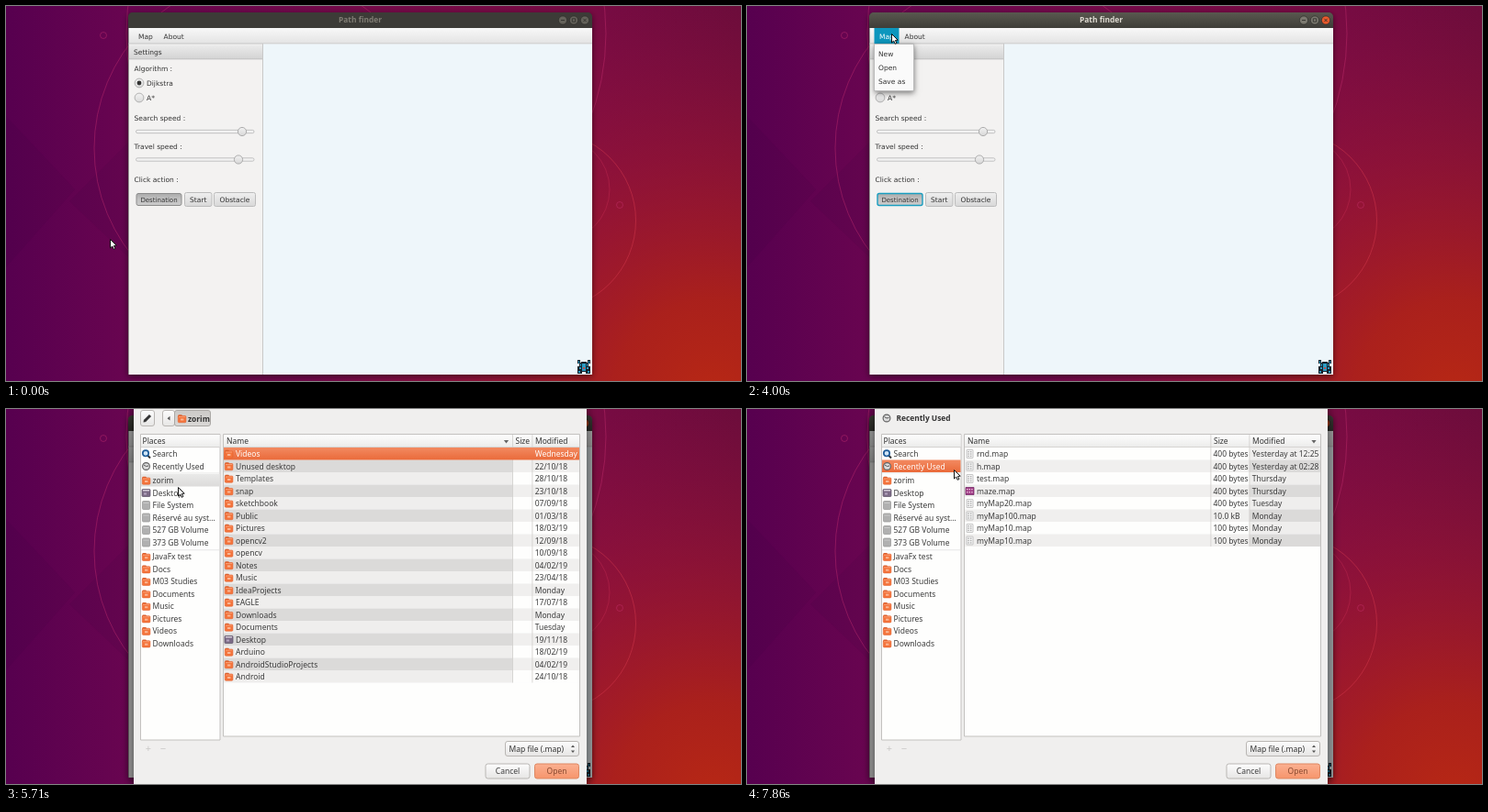
An HTML page with a canvas for the animation above (8 s loop, 800 px wide and 409 px high).

```html
<!DOCTYPE html>
<html lang="en">
<head>
<meta charset="utf-8">
<title>Path finder</title>
<style>
html, body { margin: 0; height: 100%; overflow: hidden; background: #58004f; }
canvas { display: block; }
</style>
</head>
<body>
<canvas id="stage" width="800" height="409"></canvas>
<script>
const c = document.getElementById('stage').getContext('2d');
const LOOP = 8000, FPS = 7;
const FX = '7.5px "DejaVu Sans", sans-serif';
const GTK = '8.5px "Noto Sans", sans-serif';
const BOLD = 'bold 8.4px "Noto Sans", sans-serif';
const USER = 'zorim';

// Steps (at 7 per second) at which the interface changes
const MENU_OPEN = 26, MENU_CLOSE = 34, MODAL = 36, DIALOG = 38, RECENT = 52;

// Pointer path: step, x, y
const PATH = [[0, 113, 254], [5, 113, 254], [11, 158, 150], [15, 158, 150], [18, 169, 105],
  [23, 157, 30], [30, 157, 30], [33, 152, 64], [35, 155, 66], [37, 168, 69], [40, 187, 85],
  [43, 196, 100], [47, 256, 193], [51, 200, 64], [53, 206, 62], [55, 225, 66]];

const PLACES = ['Search', 'Recently Used', USER, 'Desktop', 'File System', 'Réservé au syst…',
  '527 GB Volume', '373 GB Volume', 'JavaFx test', 'Docs', 'M03 Studies', 'Documents', 'Music',
  'Pictures', 'Videos', 'Downloads'];

const HOME = `Videos,Wednesday|Unused desktop,22/10/18|Templates,28/10/18|snap,23/10/18
sketchbook,07/09/18|Public,01/03/18|Pictures,18/03/19|opencv2,12/09/18|opencv,10/09/18
Notes,04/02/19|Music,23/04/18|IdeaProjects,Monday|EAGLE,17/07/18|Downloads,Monday
Documents,Tuesday|Desktop,19/11/18|Arduino,18/02/19|AndroidStudioProjects,04/02/19
Android,24/10/18`.split(/[|\n]/).map(row => row.split(','));

const RECENT_FILES = `rnd.map,400 bytes,Yesterday at 12:25|h.map,400 bytes,Yesterday at 02:28
test.map,400 bytes,Thursday|maze.map,400 bytes,Thursday|myMap20.map,400 bytes,Tuesday
myMap100.map,10.0 kB,Monday|myMap10.map,100 bytes,Monday
myMap10.map,100 bytes,Monday`.split(/[|\n]/).map(row => row.split(','));

function rect(x, y, w, h, fill) {
  c.fillStyle = fill;
  c.fillRect(x, y, w, h);
}

function vertical(y, h, ...colors) {
  const g = c.createLinearGradient(0, y, 0, y + h);
  colors.forEach((color, i) => g.addColorStop(i / (colors.length - 1), color));
  return g;
}

function box(x, y, w, h, r, fill, stroke, width = 1) {
  c.beginPath();
  c.roundRect(x, y, w, h, r);
  c.fillStyle = fill;
  c.fill();
  if (stroke) line(stroke, width);
}

function line(stroke, width = 1) {
  c.strokeStyle = stroke;
  c.lineWidth = width;
  c.stroke();
}

function circle(x, y, r, fill, stroke, width) {
  c.beginPath();
  c.arc(x, y, r, 0, 7);
  if (fill) { c.fillStyle = fill; c.fill(); }
  if (stroke) line(stroke, width);
}

function poly(points, fill) {
  c.beginPath();
  points.forEach(([x, y]) => c.lineTo(x, y));
  c.closePath();
  c.fillStyle = fill;
  c.fill();
}

function text(s, x, y, font, fill = '#333', align = 'left') {
  c.font = font;
  c.fillStyle = fill;
  c.textAlign = align;
  c.fillText(s, x, y);
}

function shadow(blur, draw) {
  c.save();
  c.shadowColor = 'rgba(0,0,0,.5)';
  c.shadowBlur = blur;
  c.shadowOffsetY = 2;
  draw();
  c.restore();
}

function wallpaper() {
  let g = c.createLinearGradient(0, 0, 800, 0);
  [[0, '#57004f'], [.17, '#690550'], [.5, '#760a49'], [.8, '#780b43'], [1, '#6b0c3b']]
    .forEach(stop => g.addColorStop(...stop));
  rect(0, 0, 800, 409, g);
  g = c.createRadialGradient(770, 430, 0, 770, 430, 440);
  [[0, 'rgba(184,40,20,1)'], [.25, 'rgba(180,36,22,.85)'], [.6, 'rgba(172,26,44,.45)'], [1, 'rgba(160,20,60,0)']]
    .forEach(stop => g.addColorStop(...stop));
  rect(0, 0, 800, 409, g);
  const dark = 'rgba(40,0,50,.08)';
  poly([[0, 120], [75, 200], [0, 285]], dark);
  poly([[69, 213], [150, 132], [150, 290]], dark);
  const pink = 'rgba(205,50,115,.4)';
  circle(283, 155, 187, null, pink, 1);
  circle(392, 30, 261, null, pink, 1);
  circle(588, 234, 97.5, null, 'rgba(220,60,80,.45)', 1);
  circle(600, 200, 57, null, 'rgba(210,50,90,.35)', 1);
  circle(106, 32, 3.5, null, pink, 1);
  circle(668, 217, 3.5, null, pink, 1);
}

function titleButtons(focused, modal) {
  const glyphs = modal ? ['', '-', 'x'] : ['-', 'o', 'x'];
  glyphs.forEach((glyph, i) => {
    if (!glyph) return;
    const x = 606 + i * 12, y = 15.5;
    circle(x, y, 4.6, !focused ? '#65635b' : glyph === 'x' ? '#ec5a2c' : '#7b796f', '#2f2e2a', .7);
    c.beginPath();
    if (glyph === 'o') c.rect(x - 1.7, y - 1.7, 3.4, 3.4);
    else if (glyph === '-') { c.moveTo(x - 2, y); c.lineTo(x + 2, y); }
    else {
      c.moveTo(x - 1.7, y - 1.7); c.lineTo(x + 1.7, y + 1.7);
      c.moveTo(x + 1.7, y - 1.7); c.lineTo(x - 1.7, y + 1.7);
    }
    line('#32312d', .9);
  });
}

function fxButton(label, x, w, mode) {
  const pressed = mode !== undefined;
  const fill = pressed ? vertical(204, 14, '#a9a9a9', '#c2c2c2', '#cbcbcb') : vertical(203, 16, '#f0f0f0', '#d8d8d8');
  box(x + .5, pressed ? 204.5 : 203.5, w - 1, pressed ? 13 : 15, 2, fill,
    mode ? '#1a9ec0' : pressed ? '#8c8c8c' : '#bcbcbc', mode ? 1.4 : 1);
  text(label, x + w / 2, 214, pressed ? FX.replace('7.5', '7') : FX, '#333', 'center');
}

function slider(y, thumb) {
  box(141.5, y - 1.7, 128.5, 3.4, 1.7, '#f2f2f2', '#bdbdbd', .9);
  circle(thumb, y, 4.6, vertical(y - 5, 10, '#f3f3f3', '#d6d6d6'), '#a5a5a5', .9);
}

function sprite() {
  const black = '#16202a', blue = '#2a9cc4';
  for (const side of [-1, 1]) {
    const at = (x, y, w, h, fill) => rect(629 + (side < 0 ? -x - w : x), y, w, h, fill);
    at(1, 389, 4, 5, black);
    at(4, 386, 3, 4, black);
    at(3, 393, 4, 4, black);
    at(2, 397, 5, 4, black);
    at(5, 387, 1, 3, blue);
    at(2, 390, 2, 3, blue);
    at(3, 394, 2, 2, blue);
    at(4, 398, 2, 2, blue);
  }
  rect(626, 388, 6, 11, black);
  rect(627, 390, 4, 8, blue);
  rect(628, 394, 2, 2, '#c04848');
}

function mainWindow(k) {
  const focused = k >= MENU_OPEN;
  shadow(7, () => box(133, 7, 505, 395, [5, 5, 0, 0], '#3c3b37'));
  box(133, 7, 505, 17, [5, 5, 0, 0], focused ? vertical(7, 17, '#59584f', '#3e3d38') : '#3c3b37');
  text('Path finder', 385.5, 18.3, BOLD, focused ? '#dfdbd2' : '#807d74', 'center');
  titleButtons(focused, k >= MODAL);

  rect(133.5, 24, 504.5, 17, vertical(24, 17, '#f8f8f8', '#e3e3e3'));
  rect(133.5, 41, 504.5, 361, '#f3f2f1');
  rect(133.5, 40.5, 504.5, 1, '#c6c6c6');
  rect(134, 42.5, 145.5, 15.5, vertical(42, 16, '#ececec', '#d3d3d3'));
  rect(134, 57.5, 145.5, .8, '#bbb');
  rect(280, 41.5, 358, 360.5, '#eef6fa');
  rect(279, 41, 1, 361, '#c8c8c8');
  text('Map', 144, 36, FX);
  text('About', 171.5, 36, FX);
  text('Settings', 139, 53, FX);
  [['Algorithm :', 71], ['Search speed :', 125], ['Travel speed :', 155.5], ['Click action :', 191.5]]
    .forEach(([label, y]) => text(label, 139.5, y, FX));
  [['Dijkstra', 84], ['A*', 100]].forEach(([label, y], i) => {
    circle(145, y, 4.9, vertical(y - 5, 10, '#f3f3f3', '#dadada'), '#ababab', .9);
    if (!i) circle(145, y, 2.4, '#333');
    text(label, 153, y + 3, FX);
  });
  slider(137, 257);
  slider(167.5, 253);
  fxButton('Destination', 141.5, 50, focused);
  fxButton('Start', 194, 30.5);
  fxButton('Obstacle', 226, 46);
  sprite();
}

function menu() {
  rect(138.5, 24, 27, 17, '#0c96bd');
  text('Map', 144, 36, FX, '#fff');
  shadow(6, () => rect(138.5, 41, 43, 52, '#fafafa'));
  c.strokeStyle = '#bbb';
  c.lineWidth = 1;
  c.strokeRect(138.5, 41.5, 43, 51);
  ['New', 'Open', 'Save as'].forEach((label, i) => text(label, 143, 54.7 + i * 15.3, FX));
}

function folder(x, y) {
  box(x + .3, y - 4.2, 4.5, 3, 1, '#d9602f');
  box(x + .3, y - 3, 8.6, 7.2, 1, '#f4743c', '#e2602c', .6);
  rect(x + 1, y - 2.4, 7.2, .9, '#f9a27a');
  rect(x + 3, y, 3.4, 2, '#fbb592');
}

function desktopIcon(x, y) {
  box(x, y - 4, 9, 8, 1, '#7d6c87', '#5c5266', .7);
  rect(x + 1, y - 3.5, 7, 1.5, '#d5ccd8');
  rect(x + 2, y, 3, 2, '#b4a3bf');
}

function clock(x, y) {
  circle(x + 4.5, y, 3.9, '#dcdcdc', '#5e5e5e', 1.1);
  c.beginPath();
  c.moveTo(x + 2, y - 1.5); c.lineTo(x + 4.5, y); c.lineTo(x + 7, y - .5);
  line('#555', 1);
}

function placeIcon(i, x, y) {
  if (i === 0) {
    c.beginPath();
    c.moveTo(x + 6, y + 1.5); c.lineTo(x + 9, y + 4.5);
    line('#333', 2);
    circle(x + 4, y - .7, 3.2, '#cfe4f6', '#1f5d99', 1.7);
  } else if (i === 1) clock(x, y);
  else if (i === 3) desktopIcon(x, y);
  else if (i > 3 && i < 8) {
    box(x + .5, y - 4.5, 8, 9, 1, '#b0b0b0', '#949494', .7);
    rect(x + 1.5, y - 3, 6, 1, '#c9c9c9');
  } else folder(x, y);
}

function fileIcon(name, x, y) {
  if (name === 'maze.map') {
    box(x, y - 4, 9, 8, 0, '#a03c86', '#6d2560', .7);
    for (let i = 0; i < 6; i++) rect(x + 1 + i % 3 * 2.6, y - 2.5 + (i > 2) * 3, 1.4, 1.4, '#ecc6df');
    return;
  }
  box(x + 1, y - 4.5, 7, 9, .5, '#f6f6f6', '#b0b0b0', .7);
  for (let i = 0; i < 6; i++) rect(x + 2.3 + i % 2 * 2.6, y - 3 + (i >> 1) * 2.4, 1.5, 1.3, '#aaa');
}

const orange = (y, h) => vertical(y, h, '#f28a61', '#ea6a3a');

function header(x, w) {
  rect(x, 28, w, 13.5, vertical(28, 14, '#fdfdfd', '#ebebea'));
  rect(x, 41.3, w, .8, '#c9c7c5');
}

function sidebar(recent) {
  box(146.5, 27.5, 86.5, 333.5, 0, '#fefefd', '#c3c1bf');
  header(147, 85.5);
  text('Places', 148.5, 38, GTK);
  PLACES.forEach((name, i) => {
    const y = 49 + i * 13.5 + (i > 1 ? 2 : 0) + (i > 7 ? 2.2 : 0);
    const selected = i === (recent ? 1 : 2);
    if (selected) rect(147, y - 7, 85.5, 13.5, recent ? orange(y - 7, 13.5) : vertical(y - 7, 13.5, '#e9e9e8', '#dcdbda'));
    placeIcon(i, 148, y);
    text(name, 159.5, y + 3, GTK, selected && recent ? '#fff' : '#3c3c3c');
  });
  rect(147, 69.6, 85.5, .7, '#dcdcdc');
  rect(147, 153.5, 85.5, .7, '#dcdcdc');
  text('+', 155, 374, '11px "Noto Sans", sans-serif', '#cac8c6', 'center');
  text('−', 171, 374, '11px "Noto Sans", sans-serif', '#cac8c6', 'center');
}

function fileList(recent) {
  const rows = recent ? RECENT_FILES : HOME;
  const edges = recent ? [237, 505, 547, 624] : [237, 551.5, 573, 624];
  const sorted = recent ? 2 : 0;
  box(236.5, 27.5, 388, 329.5, 0, '#fefefd', '#c3c1bf');
  header(237, 387);
  rows.forEach((row, i) => {
    for (let n = 0; n < 3; n++) {
      const fill = n === sorted ? ['#efeeed', '#dbdad9'] : ['#fefefd', '#f0efee'];
      rect(edges[n], 42 + i * 13.5, edges[n + 1] - edges[n], 13.5, fill[i % 2]);
    }
  });
  [1, 2].forEach(n => rect(edges[n] - .5, 28, .8, 14 + rows.length * 13.5, '#cfcdcb'));
  if (!recent) rect(237, 42, 387, 13.5, orange(42, 13.5));
  rows.forEach((row, i) => {
    const y = 42 + i * 13.5;
    const color = !recent && !i ? '#fff' : '#3c3c3c';
    if (recent) fileIcon(row[0], 238, y + 7);
    else (row[0] === 'Desktop' ? desktopIcon : folder)(238, y + 7);
    text(row[0], 250, y + 10, GTK, color);
    if (recent) text(row[1], 507.5, y + 10, GTK, color);
    text(row[row.length - 1], edges[2] + 2.7, y + 10, GTK, color);
  });
  ['Name', 'Size', 'Modified'].forEach((label, n) => text(label, edges[n] + 3, 38, GTK));
  const x = recent ? 617 : 544.5;
  poly([[x - 2.6, 34], [x + 2.6, 34], [x, 37.5]], '#666');
}

function gtkButton(x, y, w, h, fill = vertical(y, h, '#fdfdfd', '#e6e5e4'), stroke = '#b9b6b3') {
  box(x + .5, y + .5, w - 1, h - 1, 2.5, fill, stroke);
}

function pathBar() {
  gtkButton(146, 1, 16, 18);
  c.beginPath();
  c.moveTo(151, 13); c.lineTo(157, 7);
  line('#333', 3);
  poly([[149.5, 14.5], [150, 11.5], [152.5, 14]], '#333');
  gtkButton(170, 1, 14, 18);
  poly([[178.5, 7.8], [178.5, 12.6], [175.5, 10.2]], '#555');
  gtkButton(183, 1, 40, 18, vertical(1, 18, '#cbc9c7', '#dad8d6'), '#aaa7a4');
  folder(187, 10.5);
  text(USER, 198, 13.5, BOLD);
}

function dialog(recent) {
  box(133, 7, 505, 395, [5, 5, 0, 0], 'rgba(0,0,0,.38)');
  shadow(10, () => rect(139, -10, 493, 430, '#f0efee'));
  if (recent) {
    clock(147.5, 10);
    text('Recently Used', 162.5, 13.3, BOLD);
  } else pathBar();
  sidebar(recent);
  fileList(recent);
  gtkButton(543, 362, 81, 17);
  text('Map file (.map)', 547.5, 373.5, GTK);
  poly([[615, 369], [619, 369], [617, 366.5]], '#555');
  poly([[615, 372.5], [619, 372.5], [617, 375]], '#555');
  gtkButton(521.5, 386.5, 49, 17);
  text('Cancel', 546, 398, GTK, '#3c3c3c', 'center');
  gtkButton(575, 386.5, 49, 17, vertical(387, 16, '#fbb091', '#f6956c'), '#dd8863');
  text('Open', 599.5, 398, GTK, '#8a4a30', 'center');
}

function pointer(k) {
  const i = Math.max(1, PATH.findIndex(p => p[0] >= k));
  const [k0, x0, y0] = PATH[i - 1], [k1, x1, y1] = PATH[i];
  const u = (k - k0) / (k1 - k0);
  c.save();
  c.translate(x0 + (x1 - x0) * u, y0 + (y1 - y0) * u);
  poly([[.5, .5], [.5, 10], [2.7, 8], [4.2, 11.3], [5.9, 10.5], [4.4, 7.4], [7.2, 7.2]], '#fff');
  c.lineJoin = 'round';
  line('#111', 1);
  c.restore();
}

function draw(now) {
  const k = Math.floor((now % LOOP + 4) * FPS / 1000) % (LOOP * FPS / 1000);
  wallpaper();
  mainWindow(k);
  if (k >= MENU_OPEN && k < MENU_CLOSE) menu();
  if (k >= DIALOG) dialog(k >= RECENT);
  pointer(k);
  requestAnimationFrame(draw);
}
requestAnimationFrame(draw);
</script>
</body>
</html>
```
